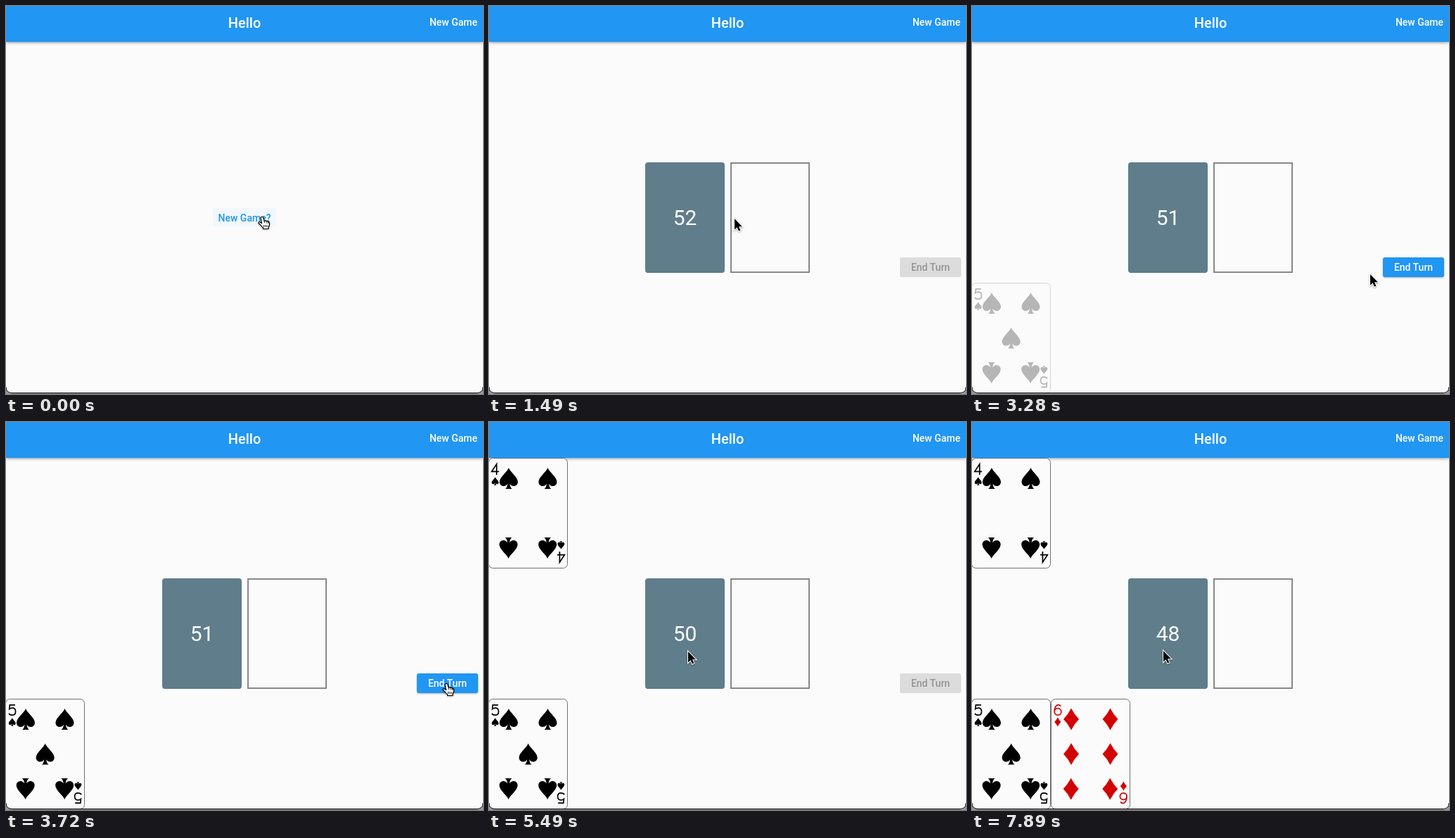
Write an HTML page that moves like this. It is 678x551 px and loops after 8 s.

```html
<!DOCTYPE html>
<html lang="en">
<head>
<meta charset="utf-8">
<title>Card table</title>
<style>
  html, body { margin: 0; width: 678px; height: 551px; overflow: hidden; background: #fafbfa; }
  svg { display: block; }
  text { font: 500 14px Roboto, Arial, sans-serif; text-anchor: middle; }
  #bar { filter: drop-shadow(0 1px 2px #0006); }
  #cursor { filter: drop-shadow(0 1px 1px #0005); }
  .index { fill: none; stroke-width: 1.7; }
</style>
</head>
<body>
<svg width="678" height="551" viewBox="0 0 678 551">
  <defs>
    <path id="spade" d="M0-15C2-9 13-2 13 5C13 12 4 13 1.5 7.5C1.8 11 3 14 5 15H-5C-3 14-1.8 11-1.5 7.5C-4 13-13 12-13 5C-13-2-2-9 0-15Z"/>
    <path id="diamond" d="M0-15.5Q4.5-6.5 11 0Q4.5 6.5 0 15.5Q-4.5 6.5-11 0Q-4.5-6.5 0-15.5Z"/>
  </defs>

  <g id="bar"><rect width="678" height="51" fill="#2196f3"/></g>
  <text x="339" y="31" fill="#fff" style="font-size:20px">Hello</text>
  <text x="636" y="28" fill="#fff">New Game</text>

  <g id="start">
    <rect x="294" y="287" width="90" height="27" rx="2" fill="#2196f3"/>
    <text x="339" y="306" fill="#2196f3">New Game?</text>
  </g>

  <g id="table">
    <rect x="222" y="222" width="113" height="157" rx="4" fill="#607d8b"/>
    <text id="count" x="278.5" y="311" fill="#fff" style="font-size:30px;font-weight:400"></text>
    <rect x="344" y="223" width="111" height="155" fill="none" stroke="#888" stroke-width="2"/>
    <g id="end">
      <rect x="584" y="357" width="87" height="28" rx="3"/>
      <text x="627.5" y="376">End Turn</text>
    </g>
  </g>

  <g id="cards"></g>

  <path d="M0 541V551H678V541Q678 550 669 550H9Q0 550 0 541Z" fill="#999"/>
  <path d="M0 541Q0 549.5 9 549.5H669Q678 549.5 678 541" fill="none" stroke="#000"/>

  <g id="cursor">
    <path id="arrow" d="M0 0V15.6L3.6 12.2L6 17.6L8.4 16.5L6 11.3H11Z" stroke="#fff" stroke-width="2" paint-order="stroke"/>
    <g id="hand" stroke="#000" stroke-width="1.2" stroke-linejoin="round">
      <path fill="#fff" d="M-2 1.5Q0-.5 1.8 1.5L3 6Q5 5 6 6.5Q8 5.8 8.5 7.5Q10.5 7 10.5 9.5Q10.8 13 9 15V17.5H1.5V16Q-1 14-2.5 11.5L-5 9.5Q-5.5 7-3 8L-.5 9.5Z"/>
      <path d="M3 6L3.6 9M6 6.5L6.4 9.4M8.5 7.5L8.8 10M2.5 12V15M4.8 12V15M7 12V15" stroke-width=".9"/>
    </g>
  </g>
</svg>
<script>
const $ = id => document.getElementById(id);
const show = (el, on) => el.style.display = on ? '' : 'none';

const digits = {
  4: 'M10.8 24V8.8L3.8 19.4H14.2',
  5: 'M13 8.8H5.4L4.8 14.6C6 13.6 7.5 13.2 9 13.2C12 13.2 13.6 15.5 13.6 18.2C13.6 21 12 23.2 9 23.2C6.5 23.2 4.9 22.4 4.1 20.8',
  6: 'M13.2 10.8C10.5 6.8 4.3 8.4 4.2 18.4A4.8 4.8 0 1 0 13.8 18.4A4.8 4.8 0 1 0 4.2 18.4'
};

function addCard(x, y, rank, suit, color) {
  const use = (px, py, s = 1) => `<use href="#${suit}" transform="translate(${px} ${py}) scale(${s})"/>`;
  const half = use(28, 29) + use(83.5, 29) + use(8.8, 33, suit === 'spade' ? .38 : .42) +
    `<path class="index" stroke="${color}" d="${digits[rank]}"/>`;
  const middle = { 4: '', 5: use(55.7, 78.5), 6: use(28, 78.5) + use(83.5, 78.5) }[rank];
  $('cards').insertAdjacentHTML('beforeend',
    `<g transform="translate(${x} ${y})" fill="${color}">
      <rect x="-.5" y=".5" width="112" height="156" rx="6" fill="#fbfbfb" stroke="#707070"/>
      ${half}${middle}<g transform="rotate(180 55.6 78.5)">${half}</g></g>`);
  return $('cards').lastElementChild;
}

const five = addCard(0, 393, 5, 'spade', '#000');
const four = addCard(0, 51, 4, 'spade', '#000');
const six = addCard(113, 393, 6, 'diamond', '#d40000');

// The screen refreshes in ticks of about 149 ms; all keys below are in ticks.
const LOOP = 8000, TICK = 148.7;
const last = (keys, n) => keys.filter(k => k[0] <= n).pop();

// tick, x, y, hand?
const path = [
  [0, 364, 299, 1], [3, 350, 302, 1], [9, 349, 302], [14, 318, 309], [15, 289, 316],
  [22, 566, 381], [23, 606, 374, 1], [24, 626, 371, 1], [27, 626, 371], [28, 516, 368], [29, 283, 326],
  [43, 345, 330], [44, 438, 338], [45, 585, 358, 1], [46, 620, 369, 1], [48, 620, 369], [49, 435, 350], [50, 272, 325]
];
const counts = [[0, 52], [19, 51], [31, 50], [41, 49], [53, 48]];
const endStates = [
  [0, 'off'], [19, 'half'], [20, 'on'], [26, 'press'], [27, ''], [35, 'off'],
  [41, 'half'], [42, 'on'], [47, 'press'], [48, '']
];
const endColors = {
  off: ['#dcdcdc', '#949494'], half: ['#8fbde4', '#d4dde4'],
  on: ['#2196f3', '#fff'], press: ['#4dabf5', '#fff']
};
const fade = (n, from) => n < from ? 0 : [.27, .75][n - from] ?? 1;

function draw(t) {
  const n = Math.floor((t + 13) / TICK);
  const playing = n >= 9;
  show($('start'), !playing);
  show($('table'), playing);
  $('start').firstElementChild.setAttribute('fill-opacity', n < 6 ? .04 : n < 7 ? .1 : .16);
  $('table').style.opacity = n === 9 ? .6 : 1;
  $('count').textContent = last(counts, n)[1];

  const state = last(endStates, n)[1];
  show($('end'), state);
  if (state) {
    const [box, label] = $('end').children;
    const [fill, ink] = endColors[state];
    box.setAttribute('fill', fill);
    label.setAttribute('fill', ink);
    box.style.filter = state === 'off' ? 'none' : 'drop-shadow(0 1px 1px #0004)';
  }

  five.style.opacity = fade(n, 22);
  four.style.opacity = fade(n, 35);
  six.style.opacity = fade(n, 42);

  const [, x, y, hand] = last(path, n);
  $('cursor').setAttribute('transform', `translate(${x} ${y})`);
  show($('hand'), hand);
  show($('arrow'), !hand);
}

const begin = performance.now();
function loop() {
  draw((performance.now() - begin) % LOOP);
  requestAnimationFrame(loop);
}
loop();
</script>
</body>
</html>
```
